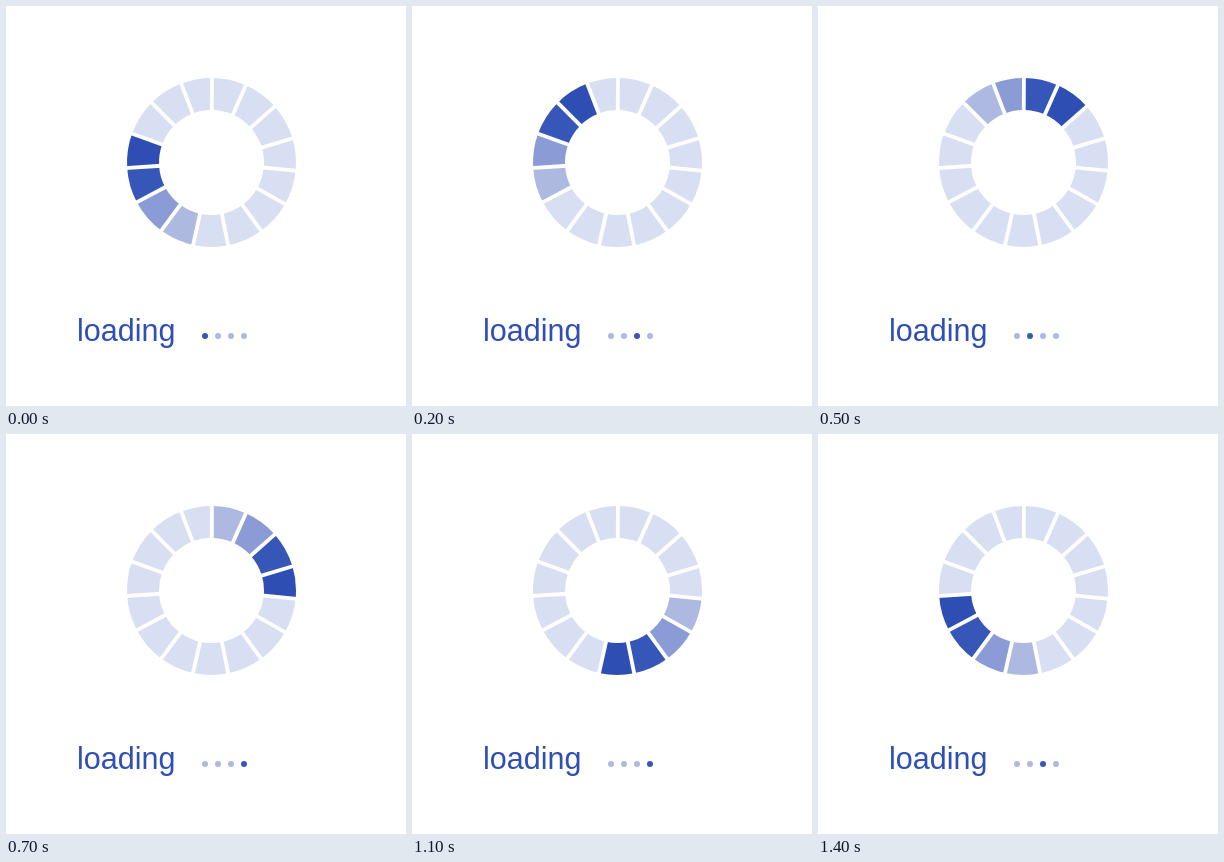
An HTML page that plays this animation: 400x400 px, repeating every 1500 ms.

```html
<!DOCTYPE html>
<html lang="en">
<head>
<meta charset="utf-8">
<title>Loading</title>
<style>
html, body { margin: 0; width: 100%; height: 100%; overflow: hidden; background: #fff; }
svg { display: block; width: 100vw; height: 100vh; }
text { font: 30.5px "Liberation Sans", Arial, sans-serif; fill: #2f4fb5; }
</style>
</head>
<body>
<svg id="stage" viewBox="0 0 400 400">
  <g id="ring"></g>
  <g id="gaps" stroke="#fff" stroke-width="3.8"></g>
  <text x="71" y="335">loading</text>
  <g id="dots"></g>
</svg>
<script>
const STEP = 100, COUNT = 15, FIRST = 11;
const CX = 205.5, CY = 156.5, OUTER = 84.5, INNER = 52.5;
const TRAIL = ['#2f4eb4', '#3757b8', '#8b9bd6', '#adb9e0'];
const IDLE = '#d9dff2';
// Slightly uneven divider angles, clockwise from the top
const cuts = [0.3, 24, 48.4, 73.4, 95.6, 119.5, 144, 168.6, 192.6, 216.4, 242, 266.3, 290, 315, 339];

function add(parent, tag, attrs) {
  const el = document.createElementNS('http://www.w3.org/2000/svg', tag);
  for (const key in attrs) el.setAttribute(key, attrs[key]);
  return document.getElementById(parent).appendChild(el);
}

function point(radius, deg) {
  const a = deg * Math.PI / 180;
  return [CX + radius * Math.sin(a), CY - radius * Math.cos(a)];
}

function sector(from, to) {
  return `M${point(OUTER, from)}A${OUTER} ${OUTER} 0 0 1 ${point(OUTER, to)}` +
    `L${point(INNER, to)}A${INNER} ${INNER} 0 0 0 ${point(INNER, from)}Z`;
}

const sectors = cuts.map((cut, i) =>
  add('ring', 'path', { d: sector(cut, i < COUNT - 1 ? cuts[i + 1] : cuts[0] + 360) }));

for (const cut of cuts) {
  const [x1, y1] = point(INNER - 2, cut);
  const [x2, y2] = point(OUTER + 2, cut);
  add('gaps', 'line', { x1, y1, x2, y2 });
}

const dots = [0, 1, 2, 3].map(i => add('dots', 'circle', { cx: 199 + 13 * i, cy: 330, r: 3 }));

function draw(time) {
  const step = Math.floor(time / STEP) % COUNT;
  const head = FIRST + step;
  sectors.forEach((el, i) => {
    const behind = (head - i + COUNT) % COUNT;
    el.setAttribute('fill', TRAIL[behind] || IDLE);
  });
  dots.forEach((el, i) => el.setAttribute('fill', i === step % 4 ? TRAIL[1] : TRAIL[3]));
}

const start = performance.now();
function tick() {
  draw(performance.now() - start);
  requestAnimationFrame(tick);
}
tick();
</script>
</body>
</html>
```
